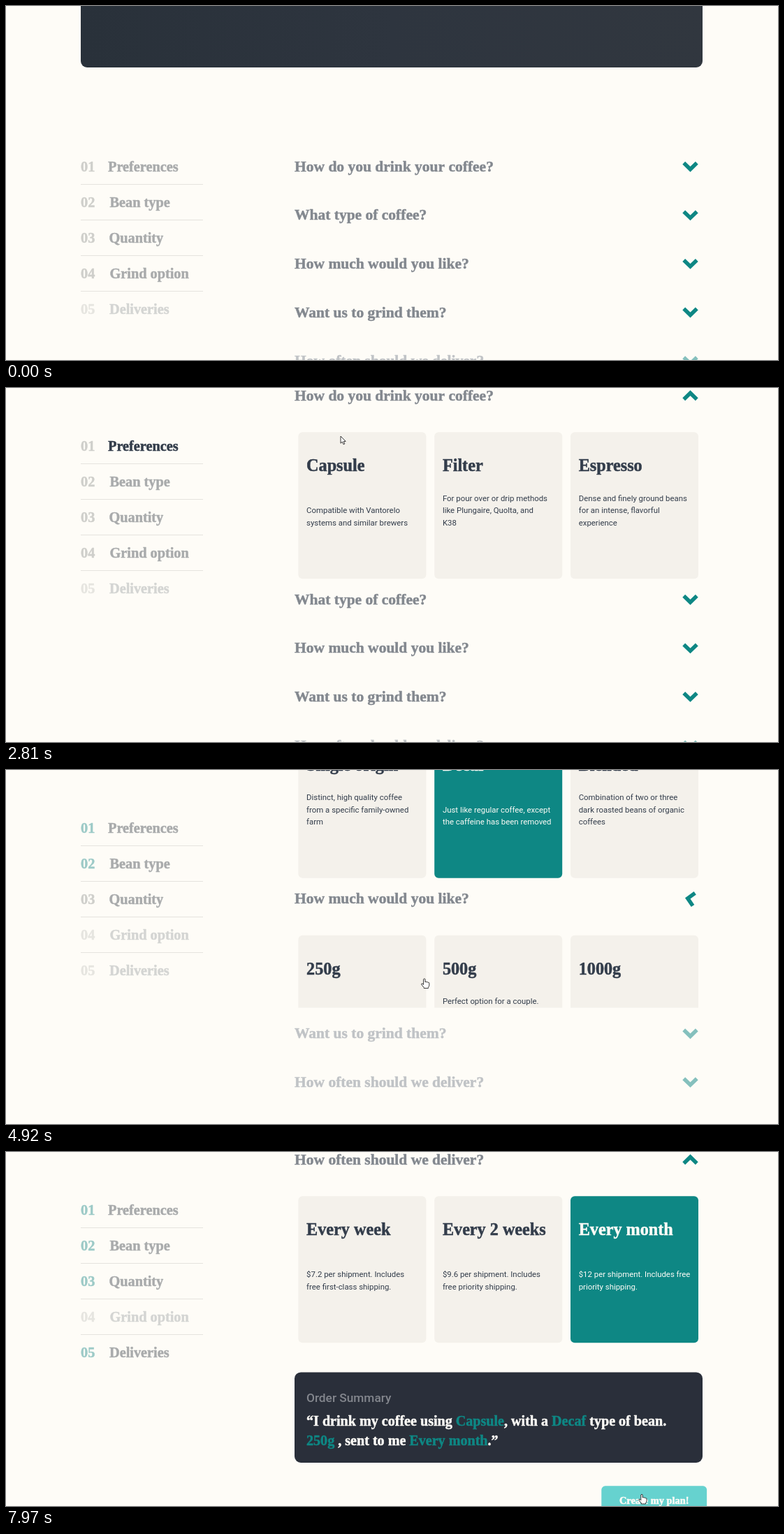
An HTML page with a canvas for the animation above (8 s loop, 1105 by 507 pixels).

```html
<!DOCTYPE html>
<html lang="en">
<head>
<meta charset="utf-8">
<title>Coffee plan</title>
<style>
html, body { margin: 0; width: 100%; height: 100%; overflow: hidden; background: #fefcf7; }
canvas { display: block; }
</style>
</head>
<body>
<canvas id="stage" width="1105" height="507"></canvas>
<script>
const g = document.getElementById('stage').getContext('2d');
const LOOP = 8000, PITCH = 69.6, CARDS = 222.4;
const BG = '#fefcf7', DARK = '#333d4b', TEAL = '#0e8784', PEACH = '#fdd6ba', CARD = '#f4f1eb';

// Each section opens at `open`; card `pick` is chosen at `at`; hover holds [card, from, to].
const sections = [
  { name: 'Preferences', q: 'How do you drink your coffee?', open: 2220, pick: 0, at: 3090,
    hover: [[0, 2810, 3300]], cards: [
    ['Capsule', 'Compatible with Vantorelo', 'systems and similar brewers'],
    ['Filter', 'For pour over or drip methods', 'like Plungaire, Quolta, and', 'K38'],
    ['Espresso', 'Dense and finely ground beans', 'for an intense, flavorful', 'experience']] },
  { name: 'Bean type', q: 'What type of coffee?', open: 3740, pick: 1, at: 4350,
    hover: [[0, 3890, 4100], [1, 4100, 4650]], cards: [
    ['Single origin', 'Distinct, high quality coffee', 'from a specific family-owned', 'farm'],
    ['Decaf', 'Just like regular coffee, except', 'the caffeine has been removed'],
    ['Blended', 'Combination of two or three', 'dark roasted beans of organic', 'coffees']] },
  { name: 'Quantity', q: 'How much would you like?', open: 4760, pick: 0, at: 5496,
    hover: [[0, 5120, 8000]], cards: [
    ['250g', 'Perfect for the solo drinker.', 'Yields about 12 delicious cups.'],
    ['500g', 'Perfect option for a couple.', 'Yields about 40 delectable', 'cups.'],
    ['1000g', 'Perfect for offices and events.', 'Yields about 90 delightful cups.']] },
  { name: 'Grind option', q: 'Want us to grind them?', open: Infinity, at: Infinity, hover: [], cards: [] },
  { name: 'Deliveries', q: 'How often should we deliver?', open: 6430, pick: 2, at: 7160,
    hover: [[1, 6700, 6940], [2, 6950, 8000]], cards: [
    ['Every week', '$7.2 per shipment. Includes', 'free first-class shipping.'],
    ['Every 2 weeks', '$9.6 per shipment. Includes', 'free priority shipping.'],
    ['Every month', '$12 per shipment. Includes free', 'priority shipping.']] }
];

// time, x, y, pointing hand
const moves = [
  [70, 1010, 459, 0], [870, 357, 127, 0], [1000, 358, 130, 0], [1150, 364, 166, 0],
  [1500, 380, 245, 0], [1720, 370, 235, 0], [2100, 200, 86, 1], [2680, 200, 84, 0],
  [2810, 479, 69, 0], [2950, 500, 150, 1], [3250, 500, 152, 1], [3650, 520, 300, 1],
  [4030, 525, 292, 1], [4100, 637, 254, 1], [4250, 690, 250, 1], [4400, 690, 250, 1],
  [4680, 610, 303, 1], [4900, 600, 300, 1], [5200, 515, 200, 1], [5520, 515, 200, 0],
  [5670, 555, 316, 0], [5950, 560, 372, 1], [6500, 560, 372, 0], [6700, 640, 255, 1],
  [6940, 797, 217, 1], [7100, 860, 205, 1], [7330, 870, 210, 1], [7780, 910, 490, 1], [8000, 910, 490, 1]
];

const clamp = v => Math.min(1, Math.max(0, v));
const smooth = (t, start, dur) => { const p = clamp((t - start) / dur); return p * p * (3 - 2 * p); };
const easeOut = (t, start) => 1 - (1 - clamp((t - start) / 500)) ** 4;
const rgb = hex => [1, 3, 5].map(i => parseInt(hex.slice(i, i + 2), 16));
function mix(a, b, p) {
  const A = rgb(a), B = rgb(b);
  return '#' + A.map((v, i) => Math.round(v + (B[i] - v) * p).toString(16).padStart(2, '0')).join('');
}

function sans(s, x, y, color, size, weight = 400) {
  g.font = `${weight} ${size}px Roboto, sans-serif`;
  g.fillStyle = color;
  g.fillText(s, x, y);
}
// Heavy serif; returns the x after the text.
function serif(s, x, y, color, size) {
  g.font = `bold ${size}px "Liberation Serif", serif`;
  g.fillStyle = g.strokeStyle = color;
  g.lineWidth = 0.5;
  g.lineJoin = 'round';
  g.fillText(s, x, y);
  g.strokeText(s, x, y);
  return x + g.measureText(s).width;
}
function box(x, y, w, h, r, fill) {
  g.beginPath();
  g.roundRect(x, y, w, h, r);
  g.fillStyle = fill;
  g.fill();
}
function line(points, color, width) {
  g.beginPath();
  points.forEach(p => g.lineTo(...p));
  g.strokeStyle = color;
  g.lineWidth = width;
  g.lineJoin = 'miter';
  g.stroke();
}

const scrollAt = t => 219 * clamp((t - 940) / 760) ** 2.57
  + 292 * (easeOut(t, 3840) + easeOut(t, 4860)) + (292 + PITCH) * easeOut(t, 6537);

// How far a section is greyed out.
function disabled(i, t) {
  if (i === 3) return smooth(t, 3090, 200);
  return i === 4 ? 1 - smooth(t, 5420, 200) : 0;
}

function hero(scroll) {
  const shade = g.createLinearGradient(107, 0, 997, 0);
  shade.addColorStop(0, '#29313a');
  shade.addColorStop(0.5, '#2e353f');
  shade.addColorStop(1, '#31373f');
  box(107, -312 - scroll, 890, 400, 9, shade);
}

function sidebar(t, scroll) {
  const top = Math.max(83, 230 - scroll);
  const nameX = [146, 148.5, 147.5, 148.5, 148];
  sections.forEach((s, i) => {
    const y = top + i * 51, off = disabled(i, t);
    const done = smooth(t, s.at, 150);
    const hot = i ? 0 : smooth(t, 2020, 150) - smooth(t, 2810, 150);
    serif('0' + (i + 1), 107, y + 6.5, mix(mix('#cfcfcb', '#e6e5e0', off), '#9dcac7', done), 20.3);
    serif(s.name, nameX[i], y + 6.5, mix(mix('#a9abac', '#d4d5d3', off), DARK, hot), 20.3);
    if (i < 4) line([[107, y + 25.5], [282, y + 25.5]], '#e5e3de', 1);
  });
}

function chevron(y, color, turn) {
  g.save();
  g.translate(979.5, y);
  g.rotate(Math.PI * turn);
  line([[-9.3, -5.2], [0, 3.8], [9.3, -5.2]], color, 5.5);
  g.restore();
}

function card(s, k, x, y, t) {
  const [title, ...lines] = s.cards[k];
  const hover = s.hover.reduce((p, [c, a, b]) =>
    c === k ? Math.max(p, smooth(t, a, 130) - smooth(t, b, 130)) : p, 0);
  const picked = k === s.pick ? smooth(t, s.at, 200) : 0;
  const ink = mix(DARK, BG, picked);
  box(x, y, 183, 210, 6, mix(mix(CARD, PEACH, hover), TEAL, picked));
  serif(title, x + 11.7, y + 56, ink, 24.2);
  const first = 98.3 + (3 - lines.length) * 17.6;
  lines.forEach((s, i) => sans(s, x + 11.7, y + first + i * 17.6, ink, 11.4));
}

// Draws all questions and returns the y where the next one would stand.
function questions(t, y) {
  sections.forEach((s, i) => {
    const open = smooth(t, s.open, 300 + (i ? 0 : 180)), off = disabled(i, t);
    serif(s.q, 413, y + 6.7, mix('#83888f', '#c0c3c6', off), 21.5);
    chevron(y, mix(TEAL, '#85c0bd', off), open);
    if (open) {
      g.save();
      g.beginPath();
      g.rect(400, y + 20, 610, 245 * open);
      g.clip();
      s.cards.forEach((c, k) => card(s, k, 418.4 + k * 194.8, y + 52.3, t));
      g.restore();
    }
    y += PITCH + CARDS * open;
  });
  return y;
}

function summary(t, y) {
  const choice = i => t < sections[i].at + 30 ? '. . .' : sections[i].cards[sections[i].pick][0];
  // Even parts are white, odd parts are answers.
  const write = (parts, y) => parts.reduce((x, s, i) => serif(s, x, y, i % 2 ? TEAL : BG, 20.1), 430);
  box(413, y, 584, 129.5, 9, '#2a2f3a');
  sans('Order Summary', 430, y + 43, '#83868d', 17.3, 500);
  write(['“I drink my coffee using ', choice(0), ', with a ', choice(1), ' type of bean.'], y + 76.5);
  const grind = t < sections[0].at ? [' ground ala ', '. . .', ', sent to me '] : [' , sent to me '];
  write(['', choice(2), ...grind, choice(4), '.”'], y + 104.5);
}

function button(t, y) {
  const ready = smooth(t, 7190, 150), hover = smooth(t, 7740, 150);
  g.save();
  g.translate(927.7, y + 20.5);
  g.scale(1 + 0.09 * hover, 1 + 0.09 * hover);
  box(-69.2, -20.5, 138.4, 41, 5, mix(mix('#e2dedb', TEAL, ready), '#66d2cf', hover));
  g.textAlign = 'center';
  serif('Create my plan!', 0, 3.3, BG, 13.2);
  g.restore();
}

function scrollMark() {
  g.beginPath();
  g.arc(357.5, 128, 8.5, 0, 7);
  g.fillStyle = '#fff';
  g.fill();
  g.strokeStyle = '#555';
  g.lineWidth = 0.9;
  g.stroke();
  for (const d of [-1, 1])
    line([[354.7, 128 + 3.2 * d], [357.5, 128 + 5.8 * d], [360.3, 128 + 3.2 * d]], '#333', 1.3);
  box(356.6, 127.1, 1.8, 1.8, 0.9, '#333');
}

const arrow = new Path2D('M0 0V10.2L2.4 8L4.1 11.8L5.8 11L4.2 7.4H7.2Z');
const hand = new Path2D('M-1.2 6.5V1Q0-.6 1.2 1V5Q2.4 4 3.3 5.2Q4.5 4.4 5.3 5.7Q6.8 5.2 7 6.8V9.5' +
  'Q6.8 11.4 5.6 12.8V14H-.6V12.9L-4 8.9Q-4.6 7-2.8 7.3L-1.2 8.8Z');

function cursor(t) {
  if (t < 70) return;
  const i = moves.findIndex(m => m[0] > t), [a, x, y, point] = moves[i - 1], [b, X, Y] = moves[i];
  const p = smooth(t, a, b - a);
  g.save();
  g.translate(x + (X - x) * p, y + (Y - y) * p);
  g.fillStyle = '#fff';
  g.strokeStyle = '#222';
  g.lineWidth = 0.9;
  g.lineJoin = 'round';
  const shape = point ? hand : arrow;
  g.fill(shape);
  g.stroke(shape);
  g.restore();
}

function draw(t) {
  const scroll = scrollAt(t);
  g.fillStyle = BG;
  g.fillRect(0, 0, 1105, 507);
  hero(scroll);
  sidebar(t, scroll);
  const end = questions(t, 230 - scroll) + 82 - PITCH;
  summary(t, end);
  button(t, end + 164.8);
  if (t >= 940 && t < 1710) scrollMark();
  cursor(t);
}

const start = performance.now();
function frame() {
  draw((performance.now() - start) % LOOP);
  requestAnimationFrame(frame);
}
frame();
</script>
</body>
</html>
```
